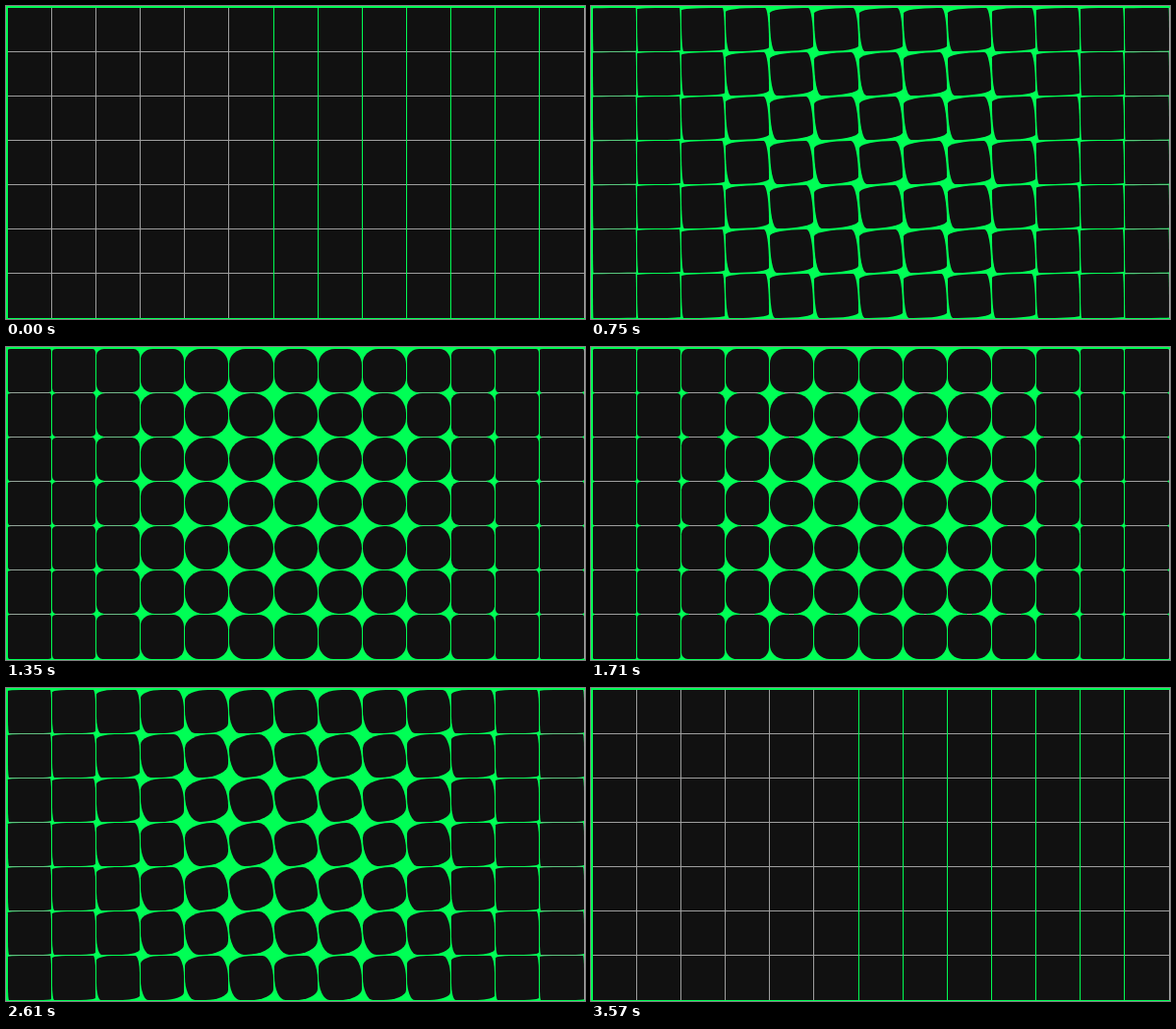
Write an HTML page with a canvas that moves like this. It is 602 px wide and 325 px high and loops after 3600 ms.

```html
<!DOCTYPE html>
<html lang="en">
<head>
<meta charset="utf-8">
<title>Morphing grid</title>
<style>
  html, body { margin: 0; width: 100%; height: 100%; overflow: hidden; background: #00ff55; }
  canvas { display: block; }
</style>
</head>
<body>
<canvas id="stage" width="602" height="325"></canvas>
<script>
const ctx = document.getElementById('stage').getContext('2d');
const COLS = 13, ROWS = 7;
const LOOP = 3600, STEP = 30, MORPH = 1700;
const GREEN = '#00ff55', DARK = '#111111', GRAY = '#a0a0a0';

const clamp01 = v => Math.max(0, Math.min(1, v));
const mix = (a, b, k) => a + (b - a) * k;
const easeInOut = k => k < 0.5 ? 4 * k ** 3 : 1 - 4 * (1 - k) ** 3;

// Cell edges snap to whole pixels, leaving one-pixel gaps.
const edgeX = i => Math.round(1.6 + i * 600 / COLS);
const edgeY = j => Math.round(1.6 + j * 323 / ROWS);

// Final corner radius fades from a circle in the middle to a square outside.
function finalRadius(i, j) {
  const dx = i - (COLS - 1) / 2, dy = j - (ROWS - 1) / 2;
  const dist = (dx ** 4 + dy ** 4) ** 0.25;
  return 22.5 / (1 + (dist / 3.6) ** 5);
}

const cells = [];
for (let j = 0; j < ROWS; j++) {
  for (let i = 0; i < COLS; i++) {
    const x = edgeX(i), y = edgeY(j);
    cells.push({
      i, j, x, y,
      w: edgeX(i + 1) - 1 - x,
      h: edgeY(j + 1) - 1 - y,
      radius: finalRadius(i, j)
    });
  }
}

function drawCell({ x, y, w, h, radius }, k) {
  const short = radius * k;
  const wide = { x: mix(w, radius, k), y: short };
  const tall = { x: short, y: mix(h, radius, k) };
  ctx.fillStyle = DARK;
  ctx.beginPath();
  ctx.roundRect(x, y, w, h, [wide, tall, wide, tall]);
  ctx.fill();
}

// Thin gaps beside still-square edges look gray.
function drawGaps({ i, j, x, y, w, h, radius }, k) {
  const short = radius * k;
  ctx.fillStyle = GRAY;
  if (j < ROWS - 1 && w > 2 * short) {
    ctx.globalAlpha = clamp01(1 - 1.2 * short * (1 - k));
    ctx.fillRect(x + short, y + h, w - 2 * short, 1);
  }
  if (i < 5) {
    ctx.globalAlpha = clamp01(1 - 30 * k);
    ctx.fillRect(x + w, y, 1, h + (j < ROWS - 1 ? 1 : 0));
  }
  ctx.globalAlpha = 1;
}

function draw(time) {
  const t = Math.floor((time % LOOP) / STEP) * STEP;
  const k = easeInOut(clamp01(Math.min(t, LOOP - t) / MORPH));
  ctx.fillStyle = GREEN;
  ctx.fillRect(0, 0, 602, 325);
  for (const cell of cells) {
    drawCell(cell, k);
    drawGaps(cell, k);
  }
  ctx.fillStyle = GRAY;
  ctx.fillRect(601, 2, 1, 322);
}

const start = performance.now();
function tick() {
  draw(performance.now() - start);
  requestAnimationFrame(tick);
}
tick();
</script>
</body>
</html>
```
